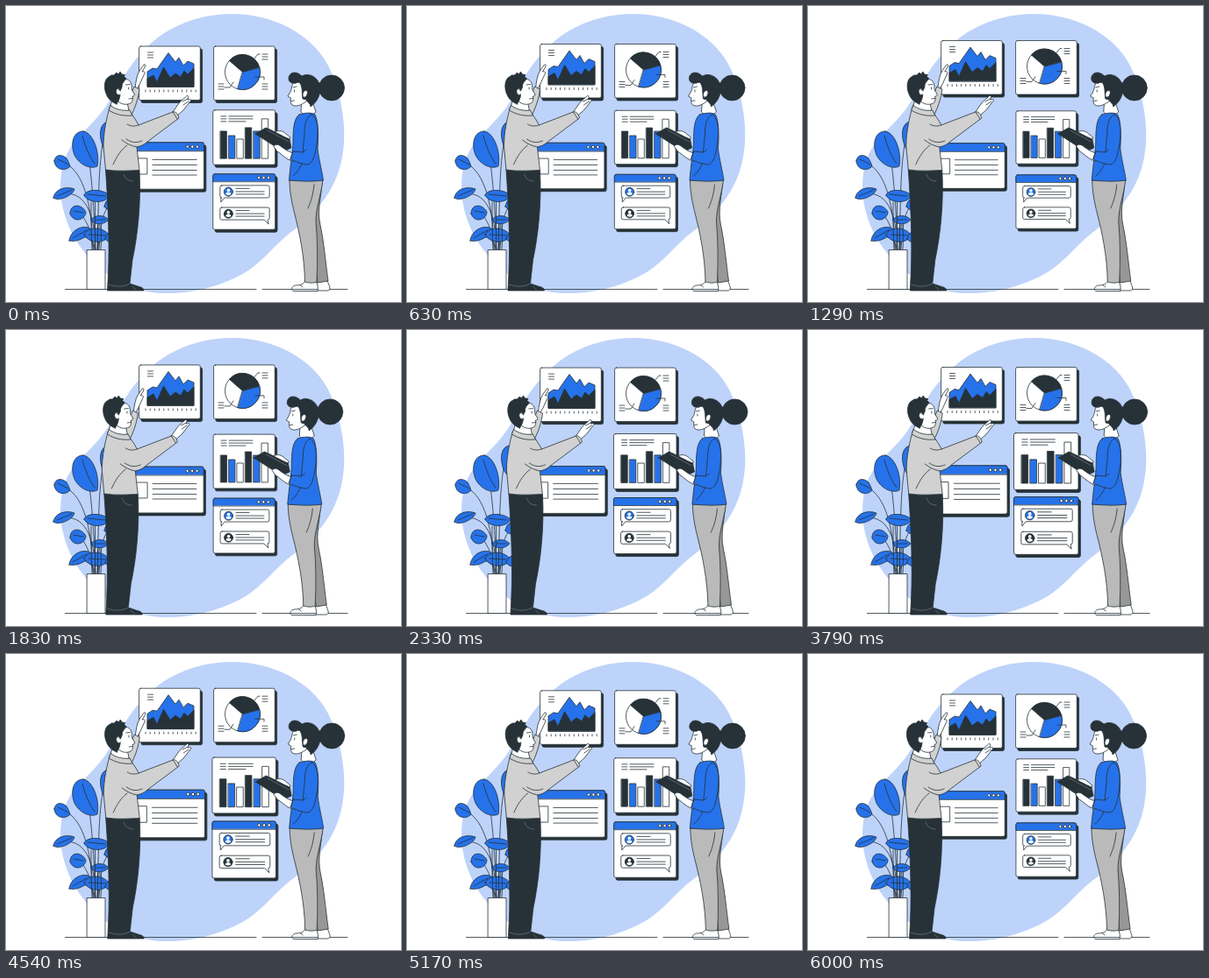
Recreate the animation shown at these times as an HTML page. Size 450 by 338 pixels, loop 6.04 s.

```html
<!DOCTYPE html>
<html lang="en">
<head>
<meta charset="utf-8">
<title>Dashboard wall</title>
<style>
html, body { margin: 0; width: 100%; height: 100%; overflow: hidden; background: #fff; }
svg { display: block; width: 450px; height: 338px; }
.ln { fill: none; }
.b { fill: #2672ea; }
.d { fill: #263238; }
.w { fill: #fff; }
.shirt { fill: #d1d1d1; }
.pants { fill: #bababa; }
.back { fill: #979797; }
.ns { stroke: none; }
</style>
</head>
<body>
<svg viewBox="0 0 450 338" stroke="#263238" stroke-width=".8" stroke-linecap="round" stroke-linejoin="round">
  <path class="ns" fill="#bed3fa" d="M258 9C302 9 347 30 367 68C383 100 388 140 384 166C378 215 345 243 320 262C300 279 289 297 262 310C236 322 212 328 182 328C135 328 100 300 80 268C62 238 58 205 66 178C74 150 100 138 118 108C136 76 152 48 185 28C208 15 232 9 258 9Z"/>
  <path class="ln" d="M67.500 323.500H285M292 323.500H389"/>

  <g id="plant">
    <path class="ln" d="M101 278C101 240 99 205 92 155M104 278C106 225 104 175 114 140M99 278C98 215 84 186 66 179M102 278C101 236 90 209 62 215M106 278C108 250 109 235 120 225M100 278C98 262 92 240 82 236M105 278C105 264 106 252 107 244M102 278C98 264 90 262 78 264M104 278C106 264 112 262 120 264"/>
    <path class="b" d="M88 143C76 143 73 158 78 170C83 181 96 187 104 183C107 168 100 145 88 143Z"/>
    <path class="b" d="M116 132C107 134 106 146 109 156C111 164 116 168 120 168V132Z"/>
    <path class="b" d="M55 177C56 169 64 169 69 174C71 177 72 180 73 183C68 189 56 188 55 177Z"/>
    <path class="b" d="M54 219C55 210 67 205 78 209C77 216 60 224 54 219Z"/>
    <path class="b" d="M89 216C92 208 110 209 118 216C115 226 93 226 89 216Z"/>
    <path class="b" d="M73 237C73 226 85 225 91 235C91 244 77 249 73 237Z"/>
    <path class="b" d="M97 244C101 238 112 238 117 244C112 250 101 251 97 244Z"/>
    <path class="b" d="M112 229C113 221 120 217 128 218V232C122 234 115 234 112 229Z"/>
    <path class="b" d="M72 268C73 257 86 249 96 254C99 259 84 271 72 268Z"/>
    <path class="b" d="M89 261C93 252 110 251 118 262C112 272 95 272 89 261Z"/>
    <path class="b" d="M113 266C114 259 120 256 128 257V269C121 271 116 270 113 266Z"/>
    <path class="ln" d="M87 148C90 160 95 172 101 180M59 175L71 181M58 217L75 210M93 215L113 217M77 234L88 236M101 244H113M76 265L92 256M94 261L113 262"/>
    <path class="ln" d="M98 278C97 262 97 240 97 224M101.500 278V224M104.500 278V250M108 278C109 262 108 254 108 250"/>
    <path class="w" d="M92.500 278.500H113V323.500H92.500Z"/>
  </g>

  <g id="top"></g>
  <g id="browser"></g>
  <g id="bars"></g>
  <g id="chat"></g>

  <g id="man">
    <path class="w" d="M147 94C148 86 149 79 152 74L157 67C159 66 159 68 158 70L155 75C158 74 159 76 157 79L152 90L147 98Z"/>
    <path class="shirt" d="M136 117C140 106 143 100 146 92L152 95C151 105 147 117 142 126Z"/>
    <path class="w" d="M122 102L119 115C126 121 134 122 140 119L138 110Z"/>
    <path class="w" d="M126 88C131 81 140 82 142.500 88C143.500 91 143 94 143.500 96L146.500 101C146.500 103 145 103 144 103C144.500 106 144.500 109 142 111C138 113 132 113 128 109Z"/>
    <path class="d" d="M126 112C121 110 116 106 114.500 101C111.500 95 111.500 86 115.500 82L120 79L123 79L126 76L128 78L130 75L132 78L135.500 78.500L134.500 80.500L137 83C135 86 132 87 132 93L130 97C129 93 126 93 126 97C126 101 128 101 130 101C130 105 128 109 126 112Z"/>
    <path class="w" d="M130 97C127 92 124 96 126 100C127 102 129 102 130 101"/>
    <path class="ln" d="M136.500 90L141 89.500M139.700 93V95M140 106L144 105.500"/>
    <path class="w" d="M190 121L197 111C200 107 204 105 206 102.500C209 102 207 106 207 107C211 106 212 107 209 110L202 119L194 126Z"/>
    <path class="ln" d="M201 109L207 106M202 113L208 109"/>
    <path class="d" d="M113.500 187L152 187.500C154 225 150 262 144 290L141 317L150 320C154 321 157 322 157 325H115.500L116.500 305C118 270 116.500 230 113.500 187Z"/>
    <path class="ln" stroke="#7e878b" stroke-width=".6" d="M117 318C125 321 134 321 141 317M144 320L148 324M134 192C136 198 140 200 145 200"/>
    <path class="shirt" d="M118 116C115 126 111 144 111 160L113.500 187C126 189 140 188 152 187.500L149 161C154 160 158 158 161 155L197 128C196 123 193 120 190 121L151 136C148 130 145 126 142 122C133 123 124 121 118 116Z"/>
    <path class="shirt" d="M119 113.500L117 119C125 124 134 126 144 125L141 119C132 120 125 118 119 113.500Z"/>
    <path class="ln" d="M149 161C143 160 137 157 132 153M151 136C146 138 141 137 138 135M138 159C131 164 126 172 122 181M137 152C144 157 150 156 155 154M190 121C192 124 194 127 195 129"/>
  </g>

  <g id="woman">
    <path class="w" d="M357 312L366 313C367 317 369 320 369 323L367 325H341C343 320 354 321 357 312Z"/>
    <path class="back" d="M338 199H360C360 215 354 232 358 250C362 268 364 292 367 314L355 316C352 285 344 250 338 222Z"/>
    <path class="w" d="M341 314L353 314C355 318 356 322 355 325.500H327C324 323 326 320 330 319C335 319 339 318 341 314Z"/>
    <path class="ln" d="M326 323.500H355M335 318.500L338 321"/>
    <path class="pants" d="M323 199L361 199C359 215 353 231 353 246C355 268 355 292 354 315C349 317 344 316 340.500 315C340 285 334 258 329 238C325 223 323 210 323 199Z"/>
    <path class="ln" d="M351 204C350 216 347 224 344 231"/>
    <circle class="d" cx="371" cy="93.500" r="14.500"/>
    <path class="w" d="M337 105L336 121C340 126 348 126 353 121L347 102Z"/>
    <path class="w" d="M329 86C325 89 326 94 324 98L321 103L324.500 105C324 108 324 111 326 113C331 116 338 112 342 109L348 95L339 85Z"/>
    <path class="d" d="M330 88C326 89 322 87 322 83C322 76 330 73 337 80C344 76 353 80 356 87C361 91 359 97 357 101C355 108 351 112 347 115C347 111 343 110 342 107L338 106C337 100 338 93 335 88C334 87 332 87 330 88Z"/>
    <path class="w" d="M338.500 99C341 94 345 97 343 101C342 105 338 105 338 102Z"/>
    <path class="ln" d="M327 93L331 92M328.500 96V98M325 108.500L328.500 108"/>
    <path class="w" d="M306 144C311 141 316 143 319 146L324 150L321 156L312 151Z"/>
    <path class="b" d="M334 124C340 122 348 121 352 124C356 132 356 149 355 163C357 178 360 188 361.500 199C348 201 335 200 322.500 199C324 180 327 165 327 155C327 140 328 128 334 124Z"/>
    <path class="d" d="M284 146L296 139C306 143 315 149 323 152L325 162L316 166C305 160 294 152 284 146Z"/>
    <path class="ln" stroke="#7f898d" stroke-width=".6" d="M298 142L322 155"/>
    <path class="w" d="M305 160C307 157 311 158 314 161L320 165L329 169L327 177C320 176 314 169 309 166Z"/>
    <path class="b" d="M348 124C356 127 356 144 354 158C352 170 350 179 344 181C338 181 330 178 324 175L327 166L338 167L340 146C340 135 342 127 348 124Z"/>
    <path class="ln" d="M338 167L342 164M327 166C326 169 325 172 324 175M337 180C334 187 330 192 327 194"/>
  </g>
</svg>
<script>
const LOOP = 6040;
const $ = id => document.getElementById(id);
const rect = (c, x, y, w, h, r = 0) => `<rect class="${c}" x="${x}" y="${y}" width="${w}" height="${h}" rx="${r}"/>`;
const path = (c, d) => `<path class="${c}" d="${d}"/>`;
const disc = (c, x, y, r) => `<circle class="${c}" cx="${x}" cy="${y}" r="${r}"/>`;
const rows = (x1, x2, ...ys) => path('ln', ys.map(y => `M${x1} ${y}H${x2}`).join(''));
const card = (x, y, w, h) => rect('d', x + 2.3, y + 3, w, h, 2) + rect('w', x, y, w, h, 2);

const header = (x, y, w, h) =>
  path('b', `M${x} ${y + h}v${2 - h}q0 -2 2 -2h${w - 4}q2 0 2 2v${h - 2}z`) +
  [7.5, 13, 18.5].map(d => disc('w', x + w - d, y + h / 2, 1.7)).join('');

function areaCard() {
  let ticks = '';
  for (let x = 159; x < 218; x += 5.2) ticks += `M${x} 96v2`;
  return card(151.6, 46, 69.7, 61.5) + rows(161.5, 167.5, 53, 56, 59) +
    path('b', 'M161 92V75L167 71L172 72L185 53.500L193 64L197 59L202 68L207 63L214 66V92Z') +
    path('d', 'M161 92V83L168 79L172 87L179.500 70L187 82L193 77L199 81L203 74L207 78L214 71V92Z') +
    path('ln', ticks);
}

function pieCard() {
  const cx = 269.5, cy = 75.5, r = 20;
  const at = deg => {
    const a = deg * Math.PI / 180;
    return `${cx + r * Math.cos(a)} ${cy + r * Math.sin(a)}`;
  };
  const slice = (c, a, b) => path(c, `M${cx} ${cy}L${at(a)}A${r} ${r} 0 0 1 ${at(b)}Z`);
  return card(236.6, 46, 69.7, 61.5) + disc('w', cx, cy, r) +
    slice('d', -139, -15) + slice('b', -15, 106) +
    path('ln', 'M282 61L287 55H289M284 81H294V84M249 93H255L259 87') +
    rows(292, 298, 55, 58, 61) + rows(292, 298, 89, 92, 95) + rows(242, 248, 89, 92, 95);
}

function barCard() {
  const bars = [['d', 143], ['b', 148], ['w', 152], ['d', 139], ['b', 143], ['w', 129]];
  return card(236, 119, 70.5, 62) + rows(245, 251, 126, 129, 132) +
    rows(254, 281, 126, 129) + rows(254, 273, 132) +
    bars.map(([c, y], i) => rect(c, 244.5 + i * 9.4, y, 7, 174 - y)).join('');
}

function bubble(y, c, tail) {
  return path('w', `M246 ${y}H298q2 0 2 2v10q0 2 -2 2${tail}H246q-2 0 -2 -2v-10q0 -2 2 -2Z`) +
    disc(c, 253.5, y + 7.2, 5) + disc('w ns', 253.5, y + 5.5, 1.8) +
    path('w ns', `M250.500 ${y + 10}q0 -2.500 3 -2.500t3 2.500q-3 2 -6 0Z`) +
    rows(262, 277, y + 3.5) + rows(262, 294, y + 7, y + 10);
}

const chatCard = () => card(236, 192, 70.5, 63) + header(236, 192, 70.5, 8.5) +
  bubble(205, 'b', 'H249l-4 5v-5') + bubble(230, 'd', 'l1 5l-5 -5');

const browserCard = () => card(128, 156, 97.3, 53) + header(128, 156, 97.3, 9.5) +
  rect('w', 142, 174, 19, 18) + rows(167, 217, 175.5, 181.5, 187.5, 193);

$('top').innerHTML = areaCard() + pieCard();
$('bars').innerHTML = barCard();
$('chat').innerHTML = chatCard();
$('browser').innerHTML = browserCard();

// time in ms, panel size from -1 (small) to 1 (large)
const swell = [[0, -.3], [1290, -1], [2330, -.1], [3210, 1], [3790, .5], [4540, .2], [6000, -1], [LOOP, -1]];
const centres = { bars: [271.5, 150.5], chat: [271.5, 224], browser: [184, 183] };

function ease(steps, t) {
  const i = steps.findIndex(s => s[0] > t);
  const [t0, a] = steps[i - 1], [t1, b] = steps[i];
  const p = (t - t0) / (t1 - t0);
  return a + (b - a) * (1 - Math.cos(Math.PI * p)) / 2;
}

const move = (id, x, y) => $(id).setAttribute('transform', `translate(${x} ${y})`);

function draw(t) {
  move('top', 0, -3.4 * (1 - Math.cos(4 * Math.PI * t / LOOP)));
  const sway = 2.6 * Math.sin(Math.PI * t / LOOP) * Math.cos(2 * Math.PI * (t - 2330) / 1250);
  move('man', sway, 0);
  move('woman', sway, 0);
  const k = 1.02 + .046 * ease(swell, t);
  for (const [id, [x, y]] of Object.entries(centres))
    $(id).setAttribute('transform', `translate(${x} ${y}) scale(${k}) translate(${-x} ${-y})`);
}

const start = performance.now();
function tick() {
  draw((performance.now() - start) % LOOP);
  requestAnimationFrame(tick);
}
tick();
</script>
</body>
</html>
```
